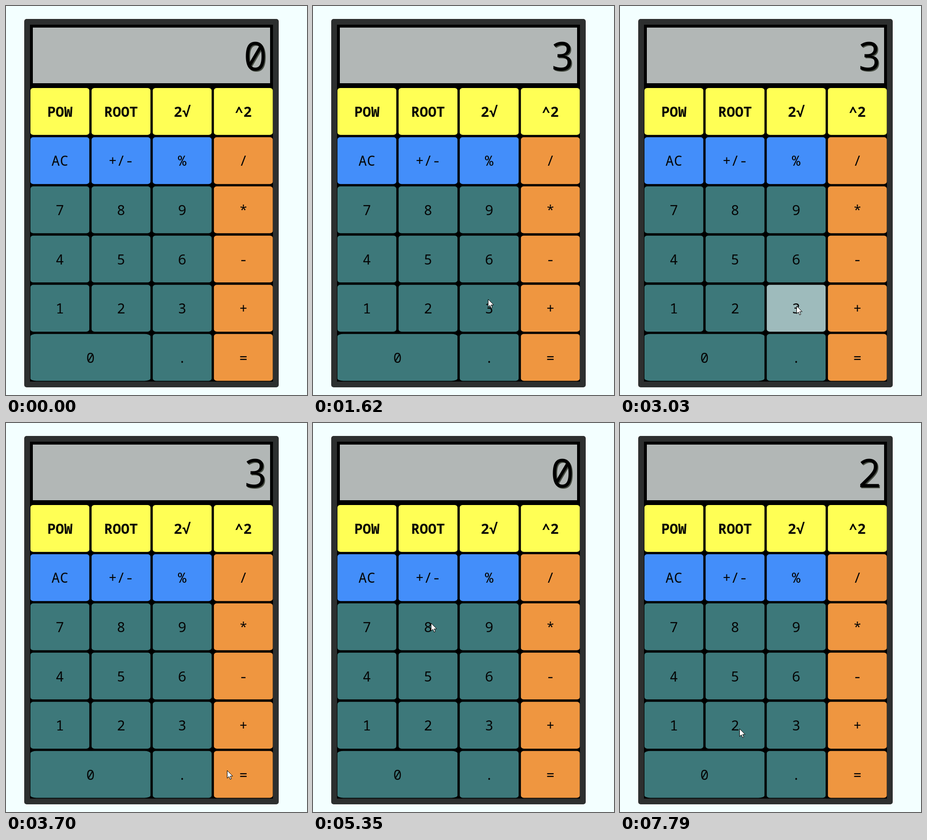
An HTML page with a canvas that plays this animation: 628 by 811 pixels, repeating every 8 s.

```html
<!DOCTYPE html>
<html lang="en">
<head>
<meta charset="utf-8">
<title>Calculator</title>
<style>
  html, body { margin: 0; width: 100%; height: 100%; overflow: hidden; background: #f3ffff; }
  canvas { display: block; }
</style>
</head>
<body>
<canvas id="stage" width="628" height="811"></canvas>
<script>
const ctx = document.getElementById('stage').getContext('2d');
const LOOP = 8000, TICK = 68.4;
const MONO = '"Noto Sans Mono", "DejaVu Sans Mono", monospace';

const YELLOW = { base: '#ffff55', lit: '#f6c48e' };
const BLUE = { base: '#438efa', lit: '#a1c6fc' };
const TEAL = { base: '#3d787a', lit: '#9ebbbc' };
const ORANGE = { base: '#ef9640', lit: '#f6c48e' };

const rows = [
  ['POW', 'ROOT', '2√', '^2'],
  ['AC', '+/-', '%', '/'],
  ['7', '8', '9', '*'],
  ['4', '5', '6', '-'],
  ['1', '2', '3', '+'],
  ['0', null, '.', '=']
];

// label, lit from, lit until (ms)
const presses = [
  ['3', 1420, 1490], ['POW', 2220, 3025], ['3', 3025, 3155], ['=', 3768, 3835],
  ['AC', 4935, 5065], ['2', 7650, 7715]
];

const readings = [[0, '0'], [1490, '3'], [3835, '27'], [5065, '0'], [7715, '2']];

// time, x, y of the pointer tip
const path = [
  [328, 567, 795], [620, 455, 660], [860, 384, 599], [1085, 365, 609],
  [1400, 365, 609], [1430, 365, 611], [1730, 365, 611],
  [1930, 288, 488], [2150, 115, 215], [2330, 115, 215],
  [2462, 220, 360], [2750, 378, 667], [2960, 368, 625], [3140, 368, 625],
  [3630, 461, 724], [4200, 461, 724],
  [4500, 360, 398], [4870, 100, 320], [5050, 100, 320],
  [5335, 246, 417], [5810, 351, 430], [6000, 351, 430],
  [6420, 222, 550], [6760, 229, 509], [7270, 229, 509],
  [7590, 249, 637], [LOOP, 249, 637]
];

// Zero at rests and turning points, so the pointer never overshoots.
function slope(i, axis) {
  const a = path[i - 1], b = path[i], c = path[i + 1];
  if (!a || !c || (b[axis] - a[axis]) * (c[axis] - b[axis]) <= 0) return 0;
  return (c[axis] - a[axis]) / (c[0] - a[0]);
}

function pointerAt(t) {
  let i = 0;
  while (i < path.length - 2 && path[i + 1][0] <= t) i++;
  const a = path[i], b = path[i + 1], span = b[0] - a[0];
  const u = Math.max(0, Math.min(1, (t - a[0]) / span)), v = 1 - u;
  return [1, 2].map(axis =>
    a[axis] * v * v * (1 + 2 * u) + b[axis] * u * u * (3 - 2 * u) +
    span * u * v * (v * slope(i, axis) - u * slope(i + 1, axis)));
}

function box(x, y, w, h, color, rx = 0, ry = rx) {
  ctx.fillStyle = color;
  ctx.beginPath();
  ctx.roundRect(x, y, w, h, { x: rx, y: ry });
  ctx.fill();
}

function label(text, x, y, font, color, align) {
  ctx.font = font + ' ' + MONO;
  ctx.textAlign = align;
  ctx.fillStyle = color;
  ctx.fillText(text, x, y);
}

function palette(row, col) {
  if (row === 0) return YELLOW;
  if (col === 3) return ORANGE;
  return row === 1 ? BLUE : TEAL;
}

function drawKey(text, row, col, t) {
  const x = 51 + col * 127.6, y = 171 + row * 102.55;
  const w = text === '0' ? 250.4 : 122.8, h = 97.7;
  const lit = presses.some(p => p[0] === text && t >= p[1] && t < p[2]);
  box(x, y, w, h, palette(row, col)[lit ? 'lit' : 'base'], w * 0.05, h * 0.05);
  label(text, x + w / 2, Math.round(y + h / 2 + 11), (row ? '' : 'bold ') + '29.3px', '#050505', 'center');
}

function drawPointer(x, y) {
  const outline = [[0, 0], [0, 16], [3.7, 12.6], [6.3, 18.5], [8.8, 17.4], [6.3, 11.7], [11.5, 11.7]];
  ctx.beginPath();
  for (const [dx, dy] of outline) ctx.lineTo(x + dx + 0.5, y + dy + 0.5);
  ctx.closePath();
  ctx.fillStyle = '#fff';
  ctx.fill();
  ctx.lineWidth = 1;
  ctx.strokeStyle = '#000';
  ctx.stroke();
}

function draw(t) {
  ctx.fillStyle = '#f3ffff';
  ctx.fillRect(0, 0, 628, 811);
  box(38, 27, 531, 768, '#2d2f2f', 5);
  box(50, 39, 507, 744, '#000');
  box(56, 45, 495, 116, '#b2b7b6');

  const reading = readings.filter(r => r[0] <= t).pop()[1];
  label(reading, 546.6, 135.5, '82px', '#444a40', 'right');
  label(reading, 544.6, 133.5, '82px', '#000', 'right');

  rows.forEach((keys, row) => keys.forEach((text, col) => {
    if (text) drawKey(text, row, col, t);
  }));

  if (t >= 330) {
    const sampled = Math.floor(t / TICK) * TICK;
    drawPointer(...pointerAt(sampled).map(Math.round));
  }
}

function frame() {
  draw(performance.now() % LOOP);
  requestAnimationFrame(frame);
}
frame();
</script>
</body>
</html>
```
